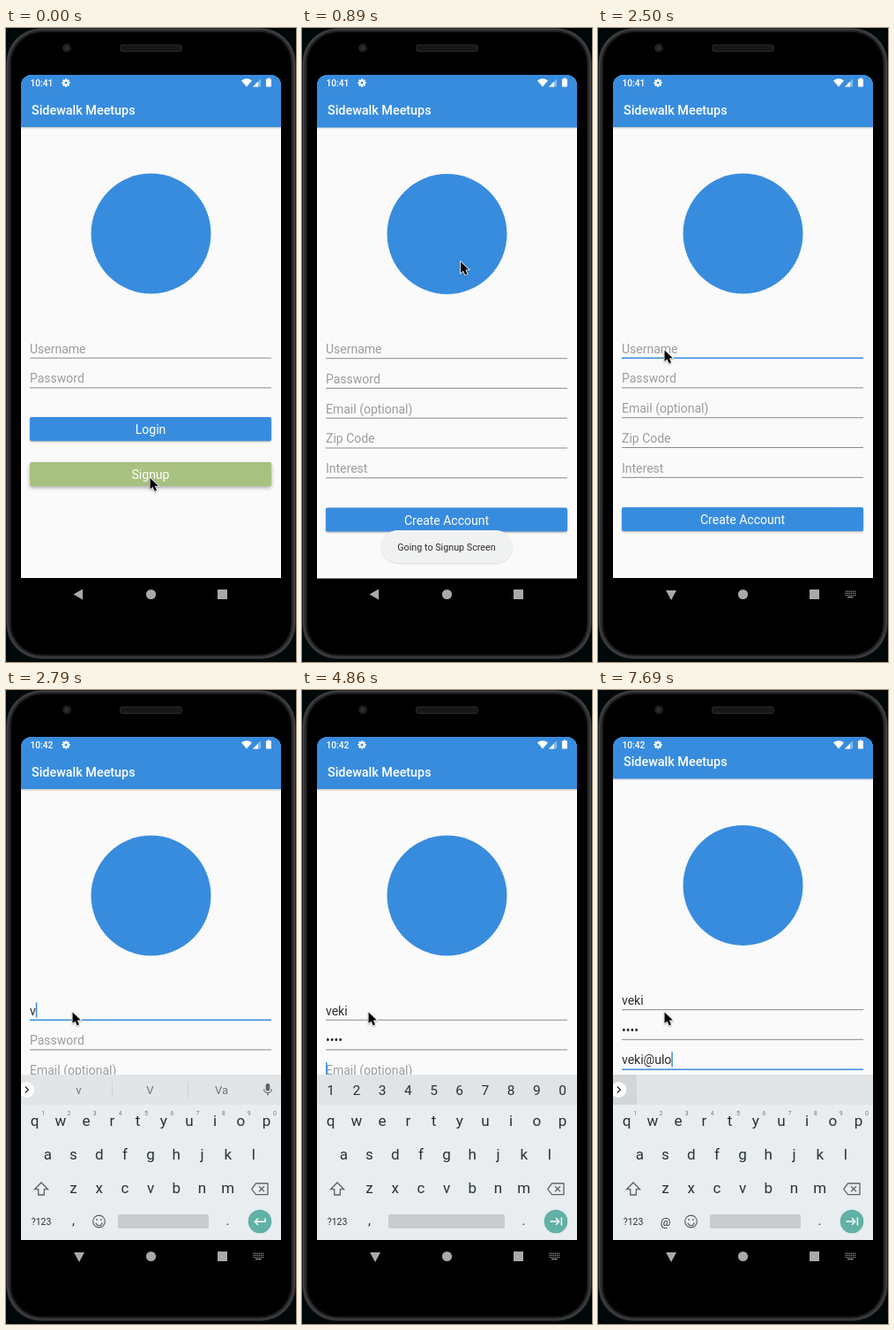
An HTML page with a canvas that plays this animation: 329x717 px, repeating every 7.99 s.

```html
<!DOCTYPE html>
<html lang="en">
<head>
<meta charset="utf-8">
<title>Signup walkthrough</title>
<style>
html, body { margin: 0; width: 100%; height: 100%; overflow: hidden; background: #000; }
canvas { display: block; width: 329px; height: 717px; }
</style>
</head>
<body>
<canvas id="stage"></canvas>
<script>
const W = 329, H = 717, LOOP = 7990;
const BLUE = '#388cde', PAGE = '#fafafa', KEY = '#263238', ICON = '#5b6469';
const FONT = 'Roboto, "Noto Sans", sans-serif';
const USER = 'veki', MAIL = USER + '@ulo';
const canvas = document.getElementById('stage');
const ratio = window.devicePixelRatio || 1;
canvas.width = W * ratio;
canvas.height = H * ratio;
const g = canvas.getContext('2d');

const TICKS = [0, 440, 590, 740, 890, 1040, 1180, 1320, 1470, 1620, 1770, 1910, 2060,
  2210, 2350, 2500, 2640, 2790, 2940, 3090, 3240, 3530, 3680, 3970, 4270, 4420, 4570,
  4860, 5010, 5300, 5450, 5900, 6050, 6190, 6640, 6940, 7390, 7540, 7690];
const MOUSE = [[300, 163.5, 509], [890, 180, 264.5], [1320, 180, 264.5], [2060, 75.5, 364.5]];

const lastOf = (list, t) => list.filter(v => v <= t).pop();
const countOf = (list, t) => list.filter(v => v <= t).length;
const ramp = (t, a, b) => Math.max(0, Math.min(1, (t - a) / (b - a)));
const ease = p => p * p * (3 - 2 * p);

function text(s, x, y, size, color, align = 'left', weight = 400) {
  g.font = `${weight} ${size}px ${FONT}`;
  g.fillStyle = color;
  g.textAlign = align;
  g.fillText(s, x, y);
  return g.measureText(s).width;
}

function rect(x, y, w, h, color) {
  g.fillStyle = color;
  g.fillRect(x, y, w, h);
}

function round(x, y, w, h, r, color) {
  g.beginPath();
  g.roundRect(x, y, w, h, r);
  g.fillStyle = color;
  g.fill();
}

function disc(x, y, r, color) {
  g.beginPath();
  g.arc(x, y, r, 0, 7);
  g.fillStyle = color;
  g.fill();
}

function poly(points, fill, stroke, width = 1, close = true) {
  g.beginPath();
  points.forEach(p => g.lineTo(p[0], p[1]));
  if (close) g.closePath();
  if (fill) { g.fillStyle = fill; g.fill(); }
  if (stroke) { g.strokeStyle = stroke; g.lineWidth = width; g.stroke(); }
}

const line = (points, color, width) => poly(points, null, color, width, false);

function shadow(color, blur, y) {
  g.shadowColor = color;
  g.shadowBlur = blur * ratio;
  g.shadowOffsetY = y * ratio;
}

function clipTo(x, y, w, h, r = 0) {
  g.beginPath();
  g.roundRect(x, y, w, h, r);
  g.clip();
}

function phone() {
  rect(0, 0, W, H, '#000809');
  round(0, 0, 329, 714, 40, '#1c1d1e');
  round(1, 0.7, 327, 712, 39, '#434547');
  round(2.5, 2, 324, 709.5, 38, '#2a2b2c');
  round(5, 4, 319, 705.5, 36, '#0c0c0d');
  round(6.5, 5.5, 316, 702.5, 35, '#000');
  disc(69, 22.5, 5, '#1c1d1f');
  disc(69, 22.5, 2.5, '#2b2d31');
  round(129, 18.5, 71, 8.5, 4, '#2a2a2a');
  round(130, 19.5, 69, 6.5, 3, '#171717');
}

function button(label, y, color, lift = 1.5) {
  g.save();
  shadow('rgba(0,0,0,.32)', lift * 1.5, lift * 0.7);
  round(27, y, 274, 27, 2, color);
  g.restore();
  text(label, 164, y + 19, 14, '#fff', 'center');
}

// A line of input; `caret` is only set on the focused one.
function field(y, hint, value, focus, caret, marked) {
  let w = 0;
  if (value) w = text(value, 27, y, 14, '#2c2c2c');
  else text(hint, 27, y, 14, '#9c9c9c');
  if (marked) rect(27, y + 2, w, 1, '#333');
  if (focus) rect(27, y + 5, 274, 1.5, BLUE);
  else rect(27, y + 5.2, 274, 1, '#8b8b8b');
  if (caret) rect(27 + w, y - 14, 1.5, 17, BLUE);
}

function header() {
  g.save();
  shadow('rgba(0,0,0,.25)', 2, 0.6);
  rect(17, 40, 295, 72, BLUE);
  g.restore();
  text('Sidewalk Meetups', 29, 97.6, 14.36, '#fff', 'left', 500);
  disc(164.5, 232.5, 68, BLUE);
}

function loginPage() {
  rect(17, 53, 295, 569, PAGE);
  header();
  field(367.5, 'Username');
  field(401.2, 'Password');
  button('Login', 440, BLUE);
  button('Signup', 491, '#a8c080', 3);
}

function signupPage(t) {
  rect(17, 53, 295, 569, PAGE);
  g.save();
  if (t >= 5010) g.translate(0, -11.6);
  const name = USER.slice(0, countOf([2790, 2940, 3090, 3240], t));
  const dots = '•'.repeat(countOf([3970, 4270, 4420, 4570], t));
  const mail = MAIL.slice(0, mailLength(t));
  const focus = t < 2210 ? -1 : t < 3530 ? 0 : t < 4860 ? 1 : 2;
  header();
  field(367.5, 'Username', name, focus === 0, focus === 0 && t >= 2640);
  field(401.2, 'Password', dots, focus === 1, focus === 1);
  field(435, 'Email (optional)', mail, focus === 2,
    focus === 2 && !(t >= 6640 && t < 6940), mail && t < 7390);
  field(468.8, 'Zip Code');
  field(502.6, 'Interest');
  button('Create Account', 542, BLUE);
  g.restore();
}

function mailLength(t) {
  return countOf([5900, 6050, 6190, 6940, 7390, 7540, 7540, 7690], t);
}

function statusBar(t) {
  rect(17, 53, 295, 16, BLUE);
  text(t < 2640 ? '10:41' : '10:42', 27.5, 65.8, 10.2, '#fff', 'left', 500);
  for (let i = 0; i < 4; i++) {
    g.save();
    g.translate(68, 62);
    g.rotate(i * Math.PI / 4);
    rect(-1, -4.6, 2, 9.2, '#fff');
    g.restore();
  }
  disc(68, 62, 3.5, '#fff');
  disc(68, 62, 1.5, BLUE);
  g.beginPath();
  g.moveTo(273, 66.5);
  g.lineTo(267, 59.5);
  g.quadraticCurveTo(273, 55, 279, 59.5);
  g.fillStyle = '#fff';
  g.fill();
  poly([[280, 66.5], [289, 66.5], [289, 57.5]], 'rgba(255,255,255,.4)');
  poly([[280, 66.5], [286, 66.5], [286, 60.5]], '#fff');
  round(295, 57.5, 6, 9, 1, '#fff');
  rect(296.7, 56.5, 2.6, 1.5, '#fff');
}

function navBar(t) {
  const c = '#a9a9a9', typing = t >= 2350;
  if (typing) poly([[77, 636], [89, 636], [83, 647]], c);
  else poly([[76.5, 640.5], [87, 634.5], [87, 646.5]], c);
  disc(164.5, 640.5, 5.6, c);
  rect(240, 635, 11, 11, c);
  if (!typing) return;
  for (let r = 0; r < 3; r++)
    for (let i = 0; i < 6; i++) rect(280.5 + i * 2.1, 636.5 + r * 2.2, 1.3, 1.3, '#8d8d8d');
  rect(283, 643, 6.5, 1.3, '#8d8d8d');
}

function suggestions(t) {
  const user = t < 3680;
  const size = user ? countOf([2790, 2940, 3090, 3240], t) : mailLength(t);
  const word = USER.slice(0, size);
  rect(17, 435, 295, 34, '#e1e5e8');
  if (user) {
    if (word) {
      const cap = word[0].toUpperCase() + word.slice(1);
      [word, cap, cap + 'a'].forEach((s, i) =>
        text(s, 82.5 + i * 81, 457, 13, '#6d757a', 'center'));
      rect(120, 443, 1, 18, '#cdd2d5');
      rect(206, 443, 1, 18, '#cdd2d5');
    }
    round(294.7, 445, 4.6, 8.5, 2.3, ICON);
    g.beginPath();
    g.arc(297, 451.3, 4.4, 0, Math.PI);
    g.strokeStyle = ICON;
    g.lineWidth = 1.1;
    g.stroke();
    rect(296.4, 455.5, 1.2, 3, ICON);
  } else {
    rect(17, 435, 27, 34, '#d2d6d8');
    if (size < 5) text(word, 163, 457, 13, '#7b8388', 'center');
  }
  g.save();
  clipTo(17, 435, 295, 34);
  disc(23.5, 452, 8.7, '#fff');
  g.restore();
  line([[21.8, 448.5], [25.3, 452], [21.8, 455.5]], '#333', 1.4);
}

function keyboard(t) {
  const digits = t >= 3680 && t < 5300, email = t >= 5300;
  rect(17, 435, 295, 187, '#e9edf0');
  if (digits) rect(17, 435, 295, 34, '#e0e4e7');
  else suggestions(t);
  [...'1234567890'].forEach((d, i) => {
    const x = 32.7 + i * 29.2;
    if (digits) text(d, x, 458, 15.5, KEY, 'center');
    else text(d, x + 9.5, 481.3, 7, '#737b80', 'center');
  });
  ['qwertyuiop', 'asdfghjkl', 'zxcvbnm'].forEach((row, r) =>
    [...row].forEach((k, i) =>
      text(k, [32.7, 47.3, 76.5][r] + i * 29.2, 493 + r * 37.8, 17, KEY, 'center')));

  poly([[40, 557], [47.5, 564.7], [43.3, 564.7], [43.3, 571], [36.7, 571], [36.7, 564.7],
    [32.5, 564.7]], null, ICON, 1.3);
  poly([[278.7, 564.3], [283.5, 558], [297, 558], [297, 570.6], [283.5, 570.6]], null, ICON, 1.3);
  line([[287, 561.3], [293, 567.3]], ICON, 1.3);
  line([[293, 561.3], [287, 567.3]], ICON, 1.3);

  text('?123', 40, 605, 10.5, KEY, 'center');
  text(email ? '@' : ',', 76.5, email ? 605.5 : 605, email ? 13 : 15, KEY, 'center');
  text('.', 251.5, 605, 15, KEY, 'center');
  if (!digits) {
    g.beginPath();
    g.arc(105.5, 601, 6.8, 0, 7);
    g.moveTo(109, 602.5);
    g.arc(105.5, 602.2, 3.5, 0.1, Math.PI - 0.1);
    g.strokeStyle = ICON;
    g.lineWidth = 1.2;
    g.stroke();
    disc(103.2, 599, 1, ICON);
    disc(107.8, 599, 1, ICON);
  }
  const left = digits ? 98 : 127;
  round(left, 593, 230 - left, 16, 2, '#c8ccce');
  disc(288, 601, 13.3, '#61b1a6');
  if (t < 3680) {
    line([[294, 597.5], [294, 601.2], [282.5, 601.2]], '#fff', 1.5);
    line([[286, 597.5], [282.3, 601.2], [286, 604.9]], '#fff', 1.5);
  } else {
    line([[281.5, 601], [291.5, 601]], '#fff', 1.5);
    line([[288, 597.2], [291.8, 601], [288, 604.8]], '#fff', 1.5);
    line([[294.4, 596.5], [294.4, 605.5]], '#fff', 1.5);
  }
}

function toast(t) {
  const a = ramp(t, 590, 890) * (1 - ramp(t, 2060, 2350));
  if (!a) return;
  g.save();
  g.globalAlpha = a;
  shadow('rgba(0,0,0,.12)', 2, 1);
  round(90, 568, 148.5, 37, 18.5, '#f0f1f1');
  g.shadowColor = 'transparent';
  text('Going to Signup Screen', 164, 590.5, 10.75, '#2e2e2e', 'center');
  g.restore();
}

function pointer(t) {
  let [, x, y] = MOUSE[0];
  for (let i = 1; i < MOUSE.length; i++) {
    const [t0] = MOUSE[i - 1], [t1, x1, y1] = MOUSE[i];
    const p = ease(ramp(t, t0, t1));
    x += (x1 - x) * p;
    y += (y1 - y) * p;
  }
  g.save();
  g.translate(x, y);
  g.scale(0.87, 0.87);
  shadow('rgba(0,0,0,.3)', 1.5, 0.8);
  const arrow = [[0, 0], [0, 14.5], [3.4, 11.4], [6, 17], [8.6, 15.8], [6.1, 10.4], [10.6, 10.2]];
  poly(arrow, '#000', '#fff', 1.8);
  g.shadowColor = 'transparent';
  poly(arrow, '#000');
  g.restore();
}

function draw(time) {
  const t = lastOf(TICKS, time);
  g.setTransform(ratio, 0, 0, ratio, 0, 0);
  phone();
  g.save();
  clipTo(17, 53, 295, 620, [12, 12, 0, 0]);
  if (t < 890) loginPage();
  if (t >= 590) {
    const rest = 1 - ramp(t, 440, 940);
    g.save();
    g.globalAlpha = ramp(t, 440, 700);
    g.translate(0, 50 * rest ** 2);
    signupPage(t);
    g.restore();
  }
  if (t >= 2640) {
    g.save();
    g.translate(0, t < 2790 ? 31 : 0);
    keyboard(t);
    g.restore();
  }
  statusBar(t);
  toast(t);
  g.restore();
  navBar(t);
  pointer(t);
}

const start = performance.now();
function tick() {
  draw((performance.now() - start) % LOOP);
  requestAnimationFrame(tick);
}
tick();
</script>
</body>
</html>
```
